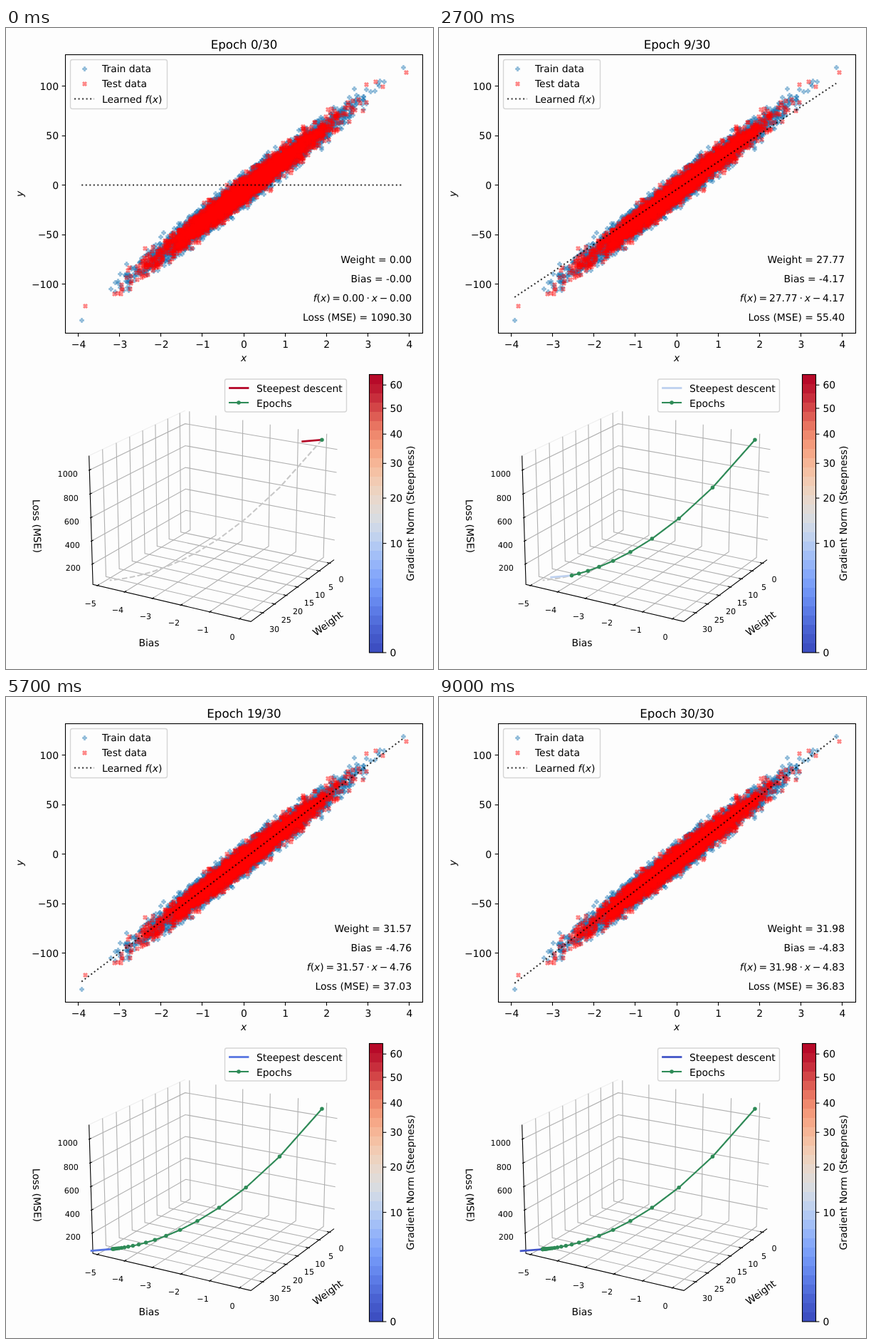
Write an HTML page with a canvas that moves like this. It is 600 by 900 pixels and loops after 9.3 s.

```html
<!DOCTYPE html>
<html lang="en">
<head>
<meta charset="utf-8">
<title>Gradient descent</title>
<style>
  html, body { margin: 0; width: 100%; height: 100%; overflow: hidden; background: #fdfdfd; }
  canvas, svg { position: absolute; left: 0; top: 0; width: 600px; height: 900px; }
  text { font-family: "DejaVu Sans", Verdana, sans-serif; font-size: 13.889px; white-space: pre; text-rendering: geometricPrecision; }
  .small { font-size: 11.111px; }
  .title { font-size: 16.667px; }
  .math { font-style: italic; }
</style>
</head>
<body>
<canvas id="cloud" width="600" height="900"></canvas>
<svg id="stage" viewBox="0 0 600 900"></svg>
<script>
const EPOCHS = 30, STEP = 300;
const THIN = 1.111, LINE = 2.083, BOLD = 2.778;
const GREEN = '#2e8b57', BLUE = '#1f77b4', RED = '#ff0000';
const svg = document.getElementById('stage');

function add(tag, attrs, text) {
  const node = document.createElementNS('http://www.w3.org/2000/svg', tag);
  for (const key in attrs) node.setAttribute(key, attrs[key]);
  if (text !== undefined) node.textContent = text;
  return svg.appendChild(node);
}
const label = (x, y, text, anchor = 'middle', cls = '') =>
  add('text', { x, y, 'text-anchor': anchor, class: cls }, text);
const turned = (x, y, angle, text, cls = '') =>
  add('text', { transform: `translate(${x} ${y}) rotate(${angle})`, 'text-anchor': 'middle', class: cls }, text);
const pathOf = points => 'M' + points.map(p => p.map(v => v.toFixed(2)).join(' ')).join('L');
const stroke = (points, color, width, extra = {}) =>
  add('path', { d: points.length ? pathOf(points) : '', fill: 'none', stroke: color, 'stroke-width': width, ...extra });
const minus = value => String(value).replace('-', '\u2212');
function range(from, to, step, visit) {
  for (let v = from; v <= to; v += step) visit(v);
}

// Training model
const W = 32.02, B = -4.838;
const state = n => ({
  w: W * (1 - 0.799 ** n),
  b: B * (1 - 0.8025 ** n),
  loss: 36.825 + 1053.475 * Math.exp(-n * (0.44884 - 0.00002 * n))
});

// Scatter plot
const X_MIN = -3.93, X_MAX = 3.85;
const sx = x => 334.5 + 58.1 * x;
const sy = y => 220.5 - 1.39 * y;

function seeded(seed) {
  return () => {
    seed = (seed + 0x6D2B79F5) | 0;
    let t = Math.imul(seed ^ (seed >>> 15), 1 | seed);
    t = (t + Math.imul(t ^ (t >>> 7), 61 | t)) ^ t;
    return ((t ^ (t >>> 14)) >>> 0) / 4294967296;
  };
}
const random = seeded(42);
function normal() {
  const z = Math.sqrt(-2 * Math.log(1 - random())) * Math.cos(2 * Math.PI * random());
  return Math.abs(z) < 3.4 ? z : normal();
}

const ctx = document.getElementById('cloud').getContext('2d');
const SIZE = 5.6;

// A marker is one arm repeated in four quarter turns
function markerPath(arm, unit) {
  const points = [];
  for (let turn = 0, [c, s] = [1, 0]; turn < 4; turn++, [c, s] = [-s, c])
    for (const [x, y] of arm) points.push([(x * c - y * s) * SIZE / unit, (x * s + y * c) * SIZE / unit]);
  return new Path2D(pathOf(points) + 'Z');
}
const plus = markerPath([[-1, -3], [1, -3], [1, -1]], 6);
const cross = markerPath([[-1, -2], [0, -1], [1, -2]], 4);

function mark(shape, color, x, y) {
  ctx.setTransform(1, 0, 0, 1, Math.round(x) + 0.5, Math.round(y) + 0.5);
  ctx.globalAlpha = 0.36;
  ctx.fillStyle = ctx.strokeStyle = color;
  ctx.lineWidth = 1.2;
  ctx.fill(shape);
  ctx.stroke(shape);
}
function scatter(shape, color, count, ends) {
  for (let i = 0; i < count; i++) {
    const x = normal();
    mark(shape, color, sx(x), sy(W * x + B + 6.07 * normal()));
  }
  for (const [x, y] of ends) mark(shape, color, sx(x), sy(y));
}
scatter(plus, BLUE, 7000, [[X_MIN, -136], [X_MAX, 119]]);
scatter(cross, RED, 3500, [[-3.85, -122], [3.92, 114]]);
mark(plus, BLUE, 110, 57);
mark(cross, RED, 110, 78);

const legendBox = (x, y, width, height) => add('rect', {
  x, y, width, height, rx: 2.8, fill: 'none', stroke: '#ccc', 'stroke-opacity': 0.8, 'stroke-width': 1.389
});
const dotted = { 'stroke-dasharray': '2.083 3.437', 'stroke-opacity': 0.8 };
const fit = stroke([], '#000', LINE, dotted);

add('rect', { x: 83.5, y: 37.5, width: 502, height: 391, fill: 'none', stroke: '#000', 'stroke-width': THIN });
range(-4, 4, 1, x => {
  const px = Math.round(sx(x)) - 0.5;
  stroke([[px, 428.5], [px, 433.4]], '#000', THIN);
  label(sx(x), 449, minus(x));
});
range(-100, 100, 50, y => {
  const py = Math.floor(sy(y)) + 0.5;
  stroke([[83.5, py], [78.6, py]], '#000', THIN);
  label(74, sy(y) + 5, minus(y), 'end');
});
label(334, 468, 'x', 'middle', 'math');
turned(24, 233, -90, 'y', 'math');

legendBox(90.5, 44.5, 136, 69);
label(135, 62, 'Train data', 'start');
label(135, 83, 'Test data', 'start');
stroke([[96, 99.5], [124, 99.5]], '#000', LINE, dotted);
label(135, 105, '', 'start').innerHTML =
  'Learned <tspan class="math">f</tspan>(<tspan class="math">x</tspan>)';

const title = label(334.5, 29, '', 'middle', 'title');
const [weightText, biasText, formula, lossText] = [0, 1, 2, 3].map(row => label(570, 330 + 27 * row, '', 'end'));

// Loss surface: perspective view of a box, every axis given as a fraction from 0 to 1
const AZIM = Math.PI / 6, ELEV = Math.PI / 9;
function project(p, q, s) {
  const X = 1.1905 * (p - 0.5), Y = 1.1905 * (q - 0.5), Z = 0.8929 * (s - 0.5);
  const near = Math.cos(AZIM) * X + Math.sin(AZIM) * Y;
  const u = Math.cos(AZIM) * Y - Math.sin(AZIM) * X;
  const v = Math.cos(ELEV) * Z - Math.sin(ELEV) * near;
  const depth = 10 - Math.cos(ELEV) * near - Math.sin(ELEV) * Z;
  return [295 + 2115 * u / depth, 676.2 - 2115 * v / depth];
}
const fw = w => (w + 2.2) / 37;
const fb = b => (b + 5.17) / 5.55;
const fz = z => (z - 22) / 1097;
const spot = ({ w, b, loss }) => project(fw(w), fb(b), fz(loss));

const line3d = (color, ...points) => stroke(points.map(p => project(...p)), color, THIN);
const grid = (...points) => line3d('#b0b0b0', ...points);
const axis = (...points) => line3d('#000', ...points);
const IN = 1 - 1 / 60, OUT = 1 + 1 / 120;
const tickLabel = ([x, y], dx, dy, text, anchor) =>
  label(x + dx, y + dy + 4, minus(text), anchor, 'small');

const eachWeight = visit => range(0, 30, 5, w => visit(fw(w), w));
const eachBias = visit => range(-5, 0, 1, b => visit(fb(b), b));
const eachLoss = visit => range(200, 1000, 200, z => visit(fz(z), z));

line3d('#eeeeee', [1, 0, 1], [0, 0, 1]);
eachWeight(p => grid([p, 1, 0], [p, 0, 0], [p, 0, 1]));
eachBias(q => grid([1, q, 0], [0, q, 0], [0, q, 1]));
eachLoss(s => grid([1, 0, s], [0, 0, s], [0, 1, s]));

axis([1, 0, 1], [1, 0, 0], [1, 1, 0], [0, 1, 0]);
eachWeight((p, w) => {
  axis([p, IN, 0], [p, OUT, 0]);
  tickLabel(project(p, 1, 0), 16.4, 22.5, w);
});
eachBias((q, b) => {
  axis([IN, q, 0], [OUT, q, 0]);
  tickLabel(project(1, q, 0), -9.9, 25.2, b);
});
eachLoss((s, z) => {
  axis([IN, 0, s], [OUT, 0, s]);
  tickLabel(project(1, 0, s), -16.4, 5.8, z, 'end');
});
label(201, 868, 'Bias');
turned(455, 840, -36.3, 'Weight');
turned(38.5, 699.5, 88.4, 'Loss (MSE)');

const track = Array.from({ length: EPOCHS + 1 }, (_, n) => spot(state(n)));
stroke(track, '#c8c8c8', LINE, { 'stroke-dasharray': '7.71 3.33' });
const arrow = stroke([], '#000', BOLD, { 'stroke-linecap': 'square' });
const trail = stroke([], GREEN, LINE, { 'stroke-linejoin': 'round' });
const dot = ([cx, cy]) => add('circle', { cx, cy, r: 2.75, fill: GREEN });
const dots = track.map(dot);

legendBox(307.5, 493, 171, 46);
const arrowKey = stroke([[314.5, 505.5], [340, 505.5]], '#000', BOLD, { 'stroke-linecap': 'square' });
label(352, 510.5, 'Steepest descent', 'start');
stroke([[313, 526], [341, 526]], GREEN, LINE);
dot([327, 526]);
label(352, 531.5, 'Epochs', 'start');

// Colour scale: a smooth curve through five colours, spaced by the square root of the norm
const COOLWARM = [[59, 76, 192], [123, 159, 249], [221, 220, 220], [244, 154, 123], [180, 4, 38]];
function coolwarm(t) {
  const last = COOLWARM.length - 1;
  const i = Math.min(Math.floor(t * last), last - 1), f = t * last - i;
  const rgb = [0, 1, 2].map(k => {
    const [a, b, c, d] = [i - 1, i, i + 1, i + 2].map(j => COOLWARM[Math.min(Math.max(j, 0), last)][k]);
    return Math.round(b + f / 2 * (c - a + f * (2 * a - 5 * b + 4 * c - d + f * (3 * (b - c) + d - a))));
  });
  return `rgb(${rgb})`;
}
const scale = norm => Math.sqrt(Math.min(norm / 64.8, 1));
const BAR_TOP = 486.5, BAR_HEIGHT = 390.5, BANDS = 30;
const barY = t => BAR_TOP + BAR_HEIGHT * (1 - t);
range(1, BANDS, 1, i => add('rect', {
  x: 510, y: barY(i / BANDS), width: 19.5, height: BAR_HEIGHT / BANDS,
  'shape-rendering': 'crispEdges', fill: coolwarm((i - 0.5) / BANDS)
}));
add('rect', { x: 510.5, y: BAR_TOP, width: 19, height: BAR_HEIGHT, fill: 'none', stroke: '#000', 'stroke-width': THIN });
range(0, 60, 10, norm => {
  const y = barY(scale(norm));
  stroke([[529.5, y], [534.4, y]], '#000', THIN);
  label(539.5, y + 5, norm, 'start');
});
turned(573, 681.5, -90, 'Gradient Norm (Steepness)');

const slope = ({ w, b }) => [W - w, B - b];

function show(n) {
  const now = state(n), { w, b, loss } = now;
  const weight = w.toFixed(2), bias = Math.abs(b).toFixed(2);
  title.textContent = `Epoch ${n}/${EPOCHS}`;
  weightText.textContent = `Weight = ${weight}`;
  biasText.textContent = `Bias = -${bias}`;
  lossText.textContent = `Loss (MSE) = ${loss.toFixed(2)}`;
  const spaced = (text, cls = '') => `<tspan dx="2.78" class="${cls}">${text}</tspan>`;
  formula.innerHTML = '<tspan class="math">f</tspan>(<tspan class="math">x</tspan>)' +
    spaced('=') + spaced(weight) + spaced('\u22c5') + spaced('x', 'math') + spaced('\u2212') + spaced(bias);

  fit.setAttribute('d', pathOf([X_MIN, X_MAX].map(x => [sx(x), sy(w * x + b)])));

  const [dw, db] = slope(now), reach = 3 / Math.hypot(dw, db);
  const tip = spot({ w: w + reach * dw, b: b + reach * db, loss });
  // The colour tells the steepness measured before the step
  const color = coolwarm(scale(2 * Math.hypot(...slope(state(Math.max(n - 1, 0))))));
  arrow.setAttribute('d', pathOf([track[n], tip]));
  arrow.setAttribute('stroke', color);
  arrowKey.setAttribute('stroke', color);
  trail.setAttribute('d', pathOf(track.slice(0, n + 1)));
  dots.forEach((node, i) => node.setAttribute('visibility', i <= n ? 'visible' : 'hidden'));
}

let shown = -1;
function tick() {
  const n = Math.floor(performance.now() / STEP) % (EPOCHS + 1);
  if (n !== shown) show(shown = n);
  requestAnimationFrame(tick);
}
tick();
</script>
</body>
</html>
```
